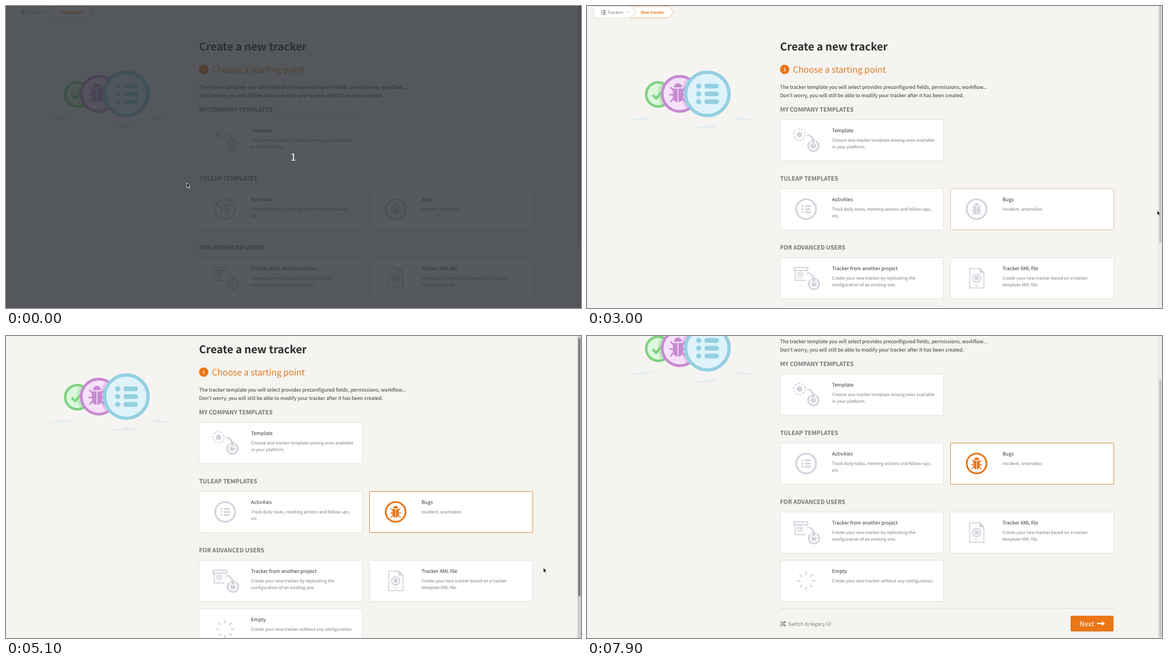
These frames come from a looping animation (1032 by 543 pixels, 8.1 s). An HTML page:

```html
<!DOCTYPE html>
<html lang="en">
<head>
<meta charset="utf-8">
<title>Create a new tracker</title>
<style>
  html, body { margin: 0; width: 100%; height: 100%; overflow: hidden; background: #f5f4f1; }
  svg { display: block; width: 1032px; height: 543px; }
  text { font-family: "Noto Sans CJK JP", "Noto Sans CJK SC", "Noto Sans CJK", "Noto Sans", sans-serif; text-rendering: geometricPrecision; }
  .icon { --ink: #d2d4dd; }
  .line { fill: none; stroke: var(--ink); }
  .solid { fill: var(--ink); }
</style>
</head>
<body>
<svg id="stage" viewBox="0 0 1032 543"></svg>
<script>
const ORANGE = '#e87718', LOOP = 8100, SCROLL_END = 136;
const stage = document.getElementById('stage');

const text = (x, y, size, fill, str, extra = '') =>
  `<text x="${x}" y="${y}" font-size="${size}" fill="${fill}" ${extra}>${str}</text>`;
const bold = 'font-weight="700"';
const at = (x, y, body, extra = '') => `<g transform="translate(${x} ${y})" ${extra}>${body}</g>`;
const ring = (r, width) => `<circle class="line" r="${r}" stroke-width="${width}"/>`;
const dot = r => `<circle class="solid" r="${r}"/>`;

// Icon parts, all drawn around their own centre
const list = [-1, 0, 1].map(i => at(0, i * 5.6,
  '<circle class="solid" cx="-6.4" r="1.8"/><rect class="solid" x="-2.2" y="-1.6" width="10.6" height="3.2" rx="1.5"/>')).join('');

const bug = `
  <path class="solid" d="M-4.6-6.4A4.6 4.6 0 0 1 4.6-6.4ZM-5.7-5H-.5V10.4C-4 10-5.7 7.500-5.7 4ZM5.7-5H.5V10.400C4 10 5.7 7.500 5.7 4Z"/>
  <path class="line" stroke-width="1.7" stroke-linecap="round"
    d="M-5-3L-8-6M5-3L8-6M-5 2H-9M5 2H9M-5 6L-8 9.500M5 6L8 9.500"/>`;

const copyTo = at(13, 10, ring(9.4, 3) + dot(5) + `
  <path class="solid" stroke="#fff" stroke-width="1.4"
    d="M-13-21.500C-4-22-.2-18 1.800-11.500L5.500-12.500 1.500-2-7-8.500-3.200-10C-4-15-7-18-13-18.500Z"/>`);

const icons = {
  template: at(-12, -10, '<circle class="line" r="10.2" stroke-width="2" stroke-dasharray="3.600 2.808"/>' + dot(5)) + copyTo,
  list: ring(17.8, 3.2) + list,
  bug: ring(17.8, 3.2) + bug,
  project: `<path class="line" stroke-width="2" d="M-22-19H3V-14H-22ZM-19.500-14V4H-1M.8-14V-6"/>` +
    at(-10.500, -6.500, ring(4.600, 1.800) + dot(2)) + at(1, .5, copyTo),
  xml: `<path class="line" stroke-width="1.8" d="M-12.500-17.500H6L13-10.500V17.500H-12.500Z"/>
    <path class="solid" d="M5-18V-9.500H13.500Z"/>` + ring(7.2, 2.3) + dot(4) +
    text(0, 14.6, 4.3, '#d2d4dd', 'XML', bold + ' text-anchor="middle"'),
  empty: [...Array(8).keys()].map(i =>
    `<path class="line" stroke-width="2.4" d="M0-10.500V-16.500" transform="rotate(${i * 45})"/>`).join(''),
};

const card = (id, x, y, icon, title, lines) => at(x, y,
  `<rect id="${id}" width="293" height="74" rx="1.5" fill="#fffffe" stroke="#e3e2de"/>` +
  at(46.8, 36.8, icons[icon], `class="icon" id="${id}Icon"`) +
  text(93.3, 22.3, 8.82, '#333', title) +
  lines.map((line, i) => text(93.3, 39.4 + i * 12.4, 7.73, '#7c7c7c', line)).join(''));

const heading = (y, str) => text(346.5, y, 10.6, '#757575', str, bold);

const medal = (name, x, y, r, width, ink, fill, inside, shade) => `
  <clipPath id="${name}"><circle cx="${x}" cy="${y}" r="${r - width}"/></clipPath>
  <g style="--ink:${ink}">` +
  at(x, y, `<circle r="${r - width / 2}" fill="${fill}" stroke="${ink}" stroke-width="${width}"/>` + inside) +
  (shade ? `<circle cx="${shade[0]}" cy="158" r="${shade[1]}" fill="${ink}" opacity=".35" clip-path="url(#${name})"/>` : '') +
  '</g>';

const scenery = `
  <path stroke="#d3e6ee" stroke-width="1.5" d="M93 201H112M114 201H118M80 204H83M85 204H105M107 204H110
    M211 215H228M230 215H233M191 218H194M196 218H222M224 218H228M262 201H266M268 201H278M266 204H290M292 204H296"/>` +
  medal('green', 128, 159, 24, 4.5, '#7fd180', '#dcf8dc',
    '<path class="line" stroke-width="4.5" d="M-10 1L-4 7 7-5"/>', [161, 34]) +
  medal('purple', 166.5, 158, 34, 5, '#c78bd1', '#f5e1f9', at(-2, -1, bug, 'transform-origin="0 0" style="scale:1.6"'), [211, 42]) +
  medal('blue', 216, 158, 42, 6, '#94d0e1', '#dff3fa', [-1, 0, 1].map(i => at(0, i * 14,
    '<circle class="solid" cx="-15.500" r="4.700"/><rect class="solid" x="-5" y="-4.300" width="25.500" height="8.600" rx="4"/>')).join(''));

const breadcrumb = `
  <path d="M11.500.5H79L89 11 79 21.500H11.500Z" fill="#fffffe" stroke="#dddcd9"/>
  <path d="M79 .5H146L156 11 146 21.500H79L89 11Z" fill="#fffffe" stroke="#eab987"/>
  <path d="M79 .5L89 11 79 21.500" fill="none" stroke="#e6e2dc"/>
  <path d="M28.500 8.500H33.500M28.500 11.500H33.500M28.500 14.500H33.500M25.500 8.500H27M25.500 11.500H27M25.500 14.500H27" stroke="#666" stroke-width="1.300"/>
  <path d="M70.500 10.500H75L72.700 13Z" fill="#c4c4c4"/>` +
  text(37, 14.3, 7.15, '#777', 'Trackers') + text(97, 14.3, 6.97, ORANGE, 'New tracker', bold);

const footer = `
  <path d="M346.500 626H945.500" stroke="#d9d9d6"/>
  <path d="M346.500 650.500H349L353 656.500H355M346.500 656.500H349L353 650.500H355" fill="none" stroke="#777" stroke-width="1.300"/>
  <path d="M354 648L357 650.500 354 653ZM354 654L357 656.500 354 659Z" fill="#777"/>
  <rect x="868" y="640" width="77" height="28" rx="2" fill="#d9d3cb"/>
  <rect id="next" x="868" y="639" width="77" height="28" rx="2"/>
  <path d="M915.500 653H925" stroke="#fff" stroke-width="2.200"/><path d="M924 648.800L929.500 653 924 657.200Z" fill="#fff"/>` +
  text(361, 656.7, 8.8, '#777', 'Switch to legacy UI') + text(884, 658, 12.3, '#fff', 'Next');

stage.innerHTML = `
  <rect width="1032" height="543" fill="#f5f4f1"/>
  <g id="page">` + breadcrumb + scenery +
  text(346.5, 80, 19.15, '#2b2b2b', 'Create a new tracker', bold) +
  `<circle cx="354.800" cy="114" r="8.400" fill="${ORANGE}"/>` +
  text(354.8, 117, 7.6, '#fff', '1', bold + ' text-anchor="middle"') +
  text(369.5, 120, 15.49, '#dd7a22', 'Choose a starting point') +
  text(346.5, 148.8, 8.83, '#333', 'The tracker template you will select provides preconfigured fields, permissions, workflow...') +
  text(346.5, 163.6, 8.83, '#333', 'Don\'t worry, you will still be able to modify your tracker after it has been created.') +
  heading(190, 'MY COMPANY TEMPLATES') +
  card('template', 346.5, 204.5, 'template', 'Template', ['Choose one tracker template among ones available', 'in your platform.']) +
  heading(314, 'TULEAP TEMPLATES') +
  card('activities', 346.5, 328.5, 'list', 'Activities', ['Track daily tasks, meeting actions and follow-ups,', 'etc.']) +
  card('bugs', 652.5, 328.5, 'bug', 'Bugs', ['Incident, anomalies']) +
  heading(438, 'FOR ADVANCED USERS') +
  card('project', 346.5, 452.5, 'project', 'Tracker from another project', ['Create your new tracker by replicating the', 'configuration of an existing one.']) +
  card('xml', 652.5, 452.5, 'xml', 'Tracker XML file', ['Create your new tracker based on a tracker', 'template XML file.']) +
  card('empty', 346.5, 539.5, 'empty', 'Empty', ['Create your new tracker without any configuration.']) +
  footer + `</g>
  <rect id="track" x="1025.500" y="-1" width="8" height="545" stroke="#dededb"/>
  <rect id="thumb" x="1027" width="4" height="464" rx="2"/>
  <g id="countdown"><rect width="1032" height="543" fill="#2c3036" opacity=".8"/>` +
  text(515.5, 278, 18, '#fff', '1', 'text-anchor="middle"') + `</g>
  <g id="cursor" stroke="#fff" stroke-width=".8" stroke-linejoin="round">
    <path id="arrow" d="M.4.3V9.200L2.400 7.400 3.800 10.600 5.300 9.900 3.900 6.900H6.300Z"/>
    <path id="hand" d="M2.300.8Q3.200 0 3.900.9V4L7 4.800Q7.800 5.200 7.500 6.800L6.800 10.300H2.400L.3 7Q.2 5.700 2.300 6.300Z"/>
  </g>`;

const el = Object.fromEntries([...stage.querySelectorAll('[id]')].map(node => [node.id, node]));

// Each key is [time, ...values]; values between keys are interpolated
const cursorKeys = [
  [600, 324, 317.5], [900, 380, 320], [1000, 380, 320], [1200, 451.5, 320], [1300, 451.5, 320], [1400, 456.5, 322],
  [1500, 456.5, 322], [1800, 700, 350], [2100, 390, 374], [2200, 306.5, 371], [2300, 295, 371], [2400, 325, 370],
  [2700, 650, 367], [3000, 1023, 367], [3200, 876, 367], [3300, 876, 367], [3500, 810, 367], [4300, 810, 367],
  [4500, 895, 390], [4700, 964, 416], [5300, 964, 416], [5500, 945, 470], [5700, 913.5, 518], [5900, 913.5, 518], [6000, 920, 521.5],
];
const scrollKeys = [[4800, 0], [4900, 4], [5000, 20], [5100, 49], [5200, 108], [5300, SCROLL_END]];
const activitiesKeys = [[1900, 0], [2000, 1], [2100, 1], [2200, .2], [2300, 0], [2400, 0], [2600, 1], [2800, 0]];
const bugsKeys = [[1600, 0], [1800, 1], [2000, 0], [2600, 0], [2800, 1], [2900, 1], [3000, .4], [3200, 1]];
const nextKeys = [[5500, 0], [5700, 1], [6900, 1], [7100, 0]];

function sample(keys, t) {
  const i = keys.findIndex(key => key[0] > t);
  if (i === 0) return keys[0].slice(1);
  if (i < 0) return keys[keys.length - 1].slice(1);
  const a = keys[i - 1], b = keys[i], k = (t - a[0]) / (b[0] - a[0]);
  return a.slice(1).map((v, j) => v + (b[j + 1] - v) * k);
}

const mix = (a, b, k) => `rgb(${a.map((v, i) => Math.round(v + (b[i] - v) * k))})`;
const show = (node, visible) => node.setAttribute('visibility', visible ? 'inherit' : 'hidden');
const move = (node, x, y) => node.setAttribute('transform', `translate(${x} ${y})`);
const border = k => mix([227, 226, 222], [209, 138, 62], k);

function draw(now) {
  const t = Math.floor(now % LOOP / 100) * 100;
  const [scroll] = sample(scrollKeys, t);
  const [x, y] = sample(cursorKeys, t);

  show(el.countdown, t < 500);
  move(el.page, 0, -scroll);
  move(el.thumb, 0, -38 + scroll * .853);

  const barHover = t >= 3700 && t < 7900;
  el.track.setAttribute('fill', barHover ? '#cfcfcd' : '#ebebe9');
  el.thumb.setAttribute('fill', barHover ? '#7d7d7b' : '#c5c5c3');

  el.activities.setAttribute('stroke', border(sample(activitiesKeys, t)[0]));
  el.bugs.setAttribute('stroke', border(sample(bugsKeys, t)[0]));
  el.bugsIcon.style.setProperty('--ink', t >= 3900 ? ORANGE : '#d2d4dd');
  el.next.setAttribute('fill', mix([234, 118, 21], [211, 106, 19], sample(nextKeys, t)[0]));

  const overCard = y > 328 && y < 403 && x > 300 && x < 946;
  const overLink = overCard || y > 503;
  move(el.cursor, x, y);
  show(el.cursor, t < 7000);
  show(el.arrow, !overLink);
  show(el.hand, overLink);
  requestAnimationFrame(draw);
}
requestAnimationFrame(draw);
</script>
</body>
</html>
```
